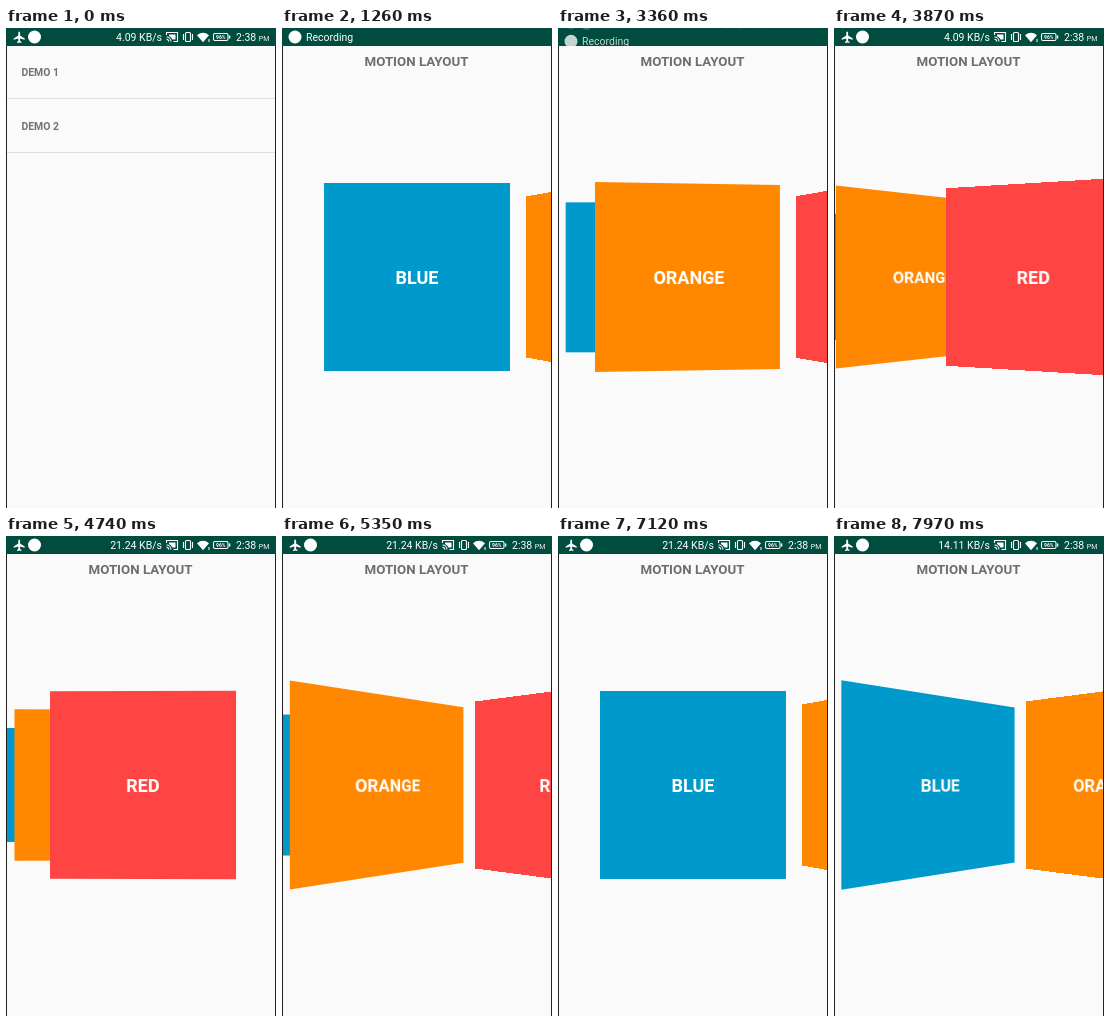
Write an HTML page that moves like this. It is 270 px wide and 480 px high and loops after 7.99 s.

```html
<!DOCTYPE html>
<html lang="en">
<head>
<meta charset="utf-8">
<title>Motion layout demo</title>
<style>
  html, body { margin: 0; width: 100%; height: 100%; overflow: hidden; }
  body { font-family: Roboto, sans-serif; }
  #stage { position: relative; width: 270px; height: 480px; overflow: hidden; background: #fafafa; }
  .page { position: absolute; inset: 0; background: #fafafa; overflow: hidden; }
  .row {
    position: absolute; left: 0; width: 270px; height: 52px; box-sizing: border-box; padding-left: 15.5px;
    font: bold 10.4px/52px Roboto, sans-serif; color: #737373;
    border-bottom: 1px solid #e0e0e0; overflow: hidden;
  }
  #ripple { position: absolute; left: 130px; top: 26px; width: 0; height: 0; border-radius: 50%; background: #777; }
  h1 { position: absolute; top: 24px; width: 269px; margin: 0; text-align: center; font: bold 13.3px/20px Roboto, sans-serif; color: #6e6e6e; }
  .card {
    position: absolute; left: 42px; top: 155px; width: 186px; height: 188px;
    text-align: center; font: bold 18px/189px Roboto, sans-serif; color: #fff;
  }
  #bar { position: absolute; left: 0; top: 0; background: #004d40; }
  .edge { position: absolute; top: 18px; width: 1px; height: 462px; background: #222; }
</style>
</head>
<body>
<div id="stage">
  <div class="page">
    <div class="row" style="top:19px"><div id="ripple"></div>DEMO 1</div>
    <div class="row" style="top:73px">DEMO 2</div>
  </div>
  <div class="page" id="detail">
    <h1>MOTION LAYOUT</h1>
    <div class="card" style="background:#0099cc">BLUE</div>
    <div class="card" style="background:#ff8800">ORANGE</div>
    <div class="card" style="background:#ff4444">RED</div>
  </div>
  <div class="edge" style="left:0"></div>
  <div class="edge" style="left:269px"></div>
  <svg id="bar" width="270" height="18" fill="#fff" font-family="Roboto, sans-serif" font-size="10.5">
    <g id="icons">
      <path d="M12.3 4.5q.9-2.2 1.8 0v3l4.6 3v1.3l-4.6-1.4v2.7l1.3 1v.9l-2.2-.6-2.2.6v-.9l1.3-1v-2.7l-4.6 1.4v-1.3l4.6-3z"/>
      <circle cx="28.5" cy="9" r="6.5"/>
      <text id="speed" x="156" y="13" text-anchor="end"></text>
      <g fill="none" stroke="#fff" stroke-width="1.1">
        <path d="M160.5 7V4.500h11v9h-4M160.500 9a4.500 4.500 0 0 1 4.500 4.500M160.500 11.300a2.200 2.200 0 0 1 2.200 2.200"/>
        <rect x="179.500" y="4.500" width="5" height="9" rx="1"/>
        <path d="M177.500 6v6M186.500 6v6"/>
        <rect x="207.500" y="5.500" width="14.500" height="7" rx="1.500"/>
      </g>
      <path d="M163 6.500h6.500v5H166.500q-1-2.500-3.500-3.500z"/>
      <path d="M191 7.200q6-4.800 12 0l-6 7zM223 7.500h1.300v3H223zM202.500 11h1v3h-1z"/>
      <text x="214.800" y="11" font-size="5" font-weight="bold" text-anchor="middle">96%</text>
      <text x="230" y="13">2:38</text>
      <text x="252.800" y="13" font-size="7">PM</text>
    </g>
    <g id="ticker">
      <circle cx="13" cy="9" r="6.5"/>
      <text x="24" y="13">Recording</text>
    </g>
  </svg>
</div>
<script>
const LOOP = 7990;
const $ = id => document.getElementById(id);
const cards = [...document.querySelectorAll('.card')];

// Carousel position over time: [ms, index of the centred card]
const keys = [
  [0, 0], [1870, 0], [2080, .12], [2400, .45], [2680, .74], [2900, .93], [3130, 1],
  [3310, 1], [3360, 1.027], [3460, 1.1], [3700, 1.42], [4000, 1.8], [4250, 1.975], [4420, 2],
  [4620, 2], [4740, 1.99], [5000, 1.72], [5350, 1.253], [5520, 1.07], [5690, 1],
  [6010, 1], [6200, .88], [6490, .573], [6820, .12], [7100, 0],
  [7430, 0], [7600, .11], [7830, .29], [7970, .258], [LOOP, .25]
];

const slope = i => (keys[i + 1][1] - keys[i][1]) / (keys[i + 1][0] - keys[i][0]);

function tangent(i) {
  if (i === 0 || i === keys.length - 1) return 0;
  const a = slope(i - 1), b = slope(i);
  return a * b > 0 ? 2 * a * b / (a + b) : 0;
}

// Monotone cubic through the keys
function position(t) {
  let i = 0;
  while (t >= keys[i + 1][0]) i++;
  const [t0, v0] = keys[i], [t1, v1] = keys[i + 1];
  const d = t1 - t0, u = (t - t0) / d, w = 1 - u;
  return v0 * w * w * (1 + 2 * u) + v1 * u * u * (3 - 2 * u)
    + d * u * w * (tangent(i) * w - tangent(i + 1) * u);
}

const ramp = (t, from, to) => Math.min(1, Math.max(0, (t - from) / (to - from)));
const easeOut = x => 1 - (1 - x) ** 3;

function placeCard(card, p) {
  let x = 185 * p, angle = -17.3 * p, scale = 1;
  if (p < 0) {
    const q = -p;
    scale = 1 - .2 * q;
    x = q < 1 ? -q * (148 - 170 * q + 74 * q * q) : -52 * q;
    angle = q < .29 ? 63 * q : q < 1 ? 18.3 * Math.cos((q - .29) / .71 * Math.PI / 2) : 0;
  }
  card.style.visibility = p > 1.5 ? 'hidden' : 'inherit';
  card.style.transform = `translateX(${x}px) perspective(165px) rotateY(${angle}deg) scale(${scale})`;
}

function shift(el, y, alpha) {
  el.setAttribute('transform', `translate(0 ${y})`);
  el.setAttribute('opacity', alpha);
}

function draw(t) {
  const grow = easeOut(ramp(t, 40, 560)), r = 150 * grow;
  Object.assign($('ripple').style, {
    width: 2 * r + 'px', height: 2 * r + 'px', margin: `${-r}px`,
    opacity: .2 * (1 - ramp(t, 450, 800))
  });

  const open = easeOut(ramp(t, 560, 920));
  Object.assign($('detail').style, {
    opacity: open, visibility: open ? 'visible' : 'hidden',
    transform: open < 1 ? `translateY(${38 * (1 - open)}px)` : 'none'
  });

  const pos = position(t);
  cards.forEach((card, i) => placeCard(card, i - pos));

  // Notice pushes the icons up, then drops away as they return
  const shown = ramp(t, 940, 1250) - ramp(t, 3290, 3590);
  shift($('ticker'), 18 * (1 - shown), shown);
  shift($('icons'), -18 * shown, 1 - shown);
  $('speed').textContent = (t < 4600 ? '4.09' : t < 7590 ? '21.24' : '14.11') + ' KB/s';
}

function frame() {
  draw(performance.now() % LOOP);
  requestAnimationFrame(frame);
}
frame();
</script>
</body>
</html>
```
